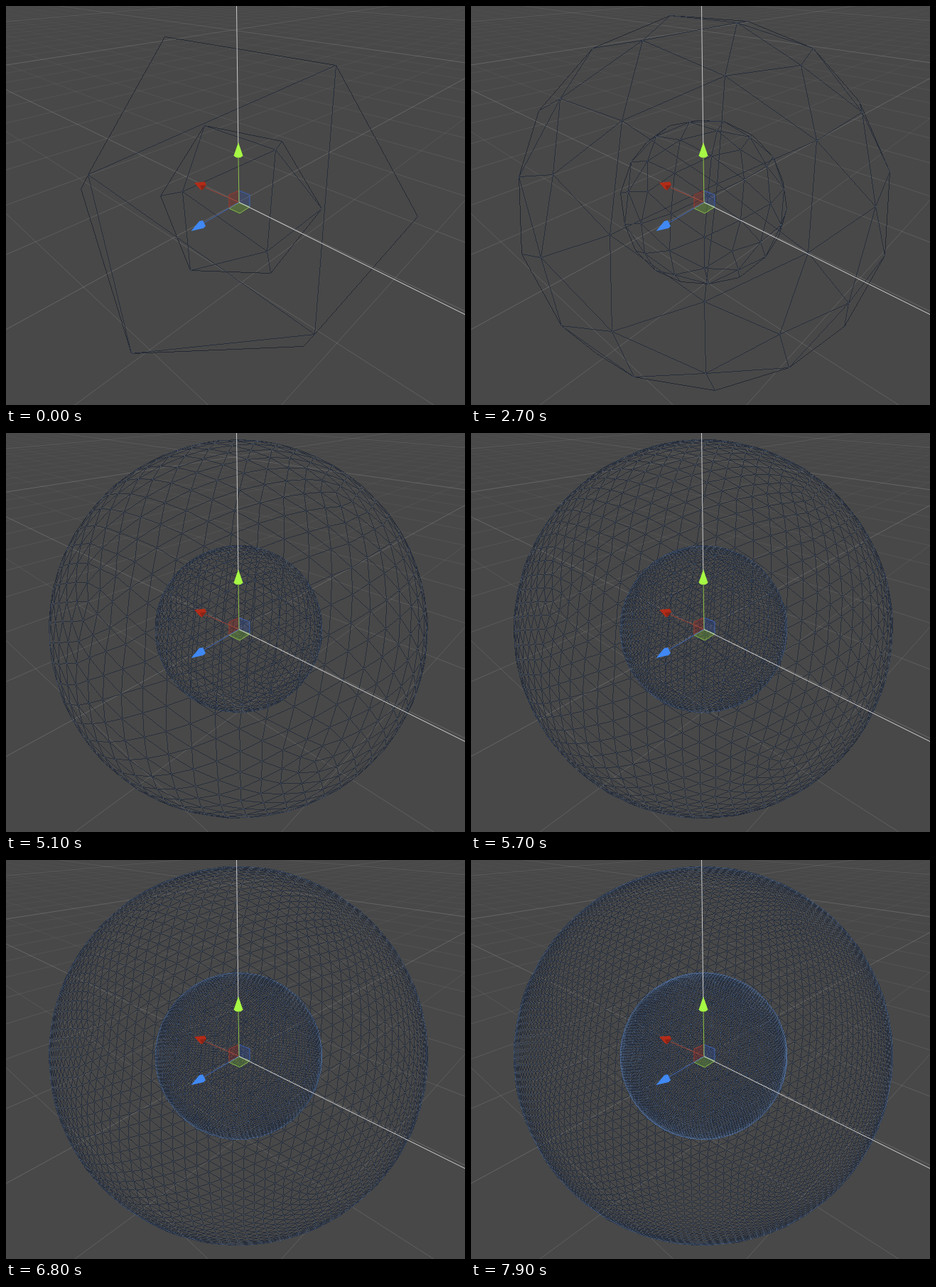
An HTML page with a canvas that plays this animation: 646x562 px, repeating every 8 s.

```html
<!DOCTYPE html>
<html>
<head>
<meta charset="utf-8">
<style>
html, body { margin: 0; width: 100%; height: 100%; overflow: hidden; background: #484848; }
canvas { display: block; }
</style>
</head>
<body>
<canvas id="stage" width="646" height="562"></canvas>
<script>
const W = 646, H = 562, LOOP = 8000;
const ctx = document.getElementById('stage').getContext('2d', { willReadFrequently: true });

// Image of the world origin, ground cell size, sphere radii
const OX = 327.6, OY = 276.2, CELL = 0.482, RADII = [1, 0.479];

// A view turns world points into [right, up, towards] and then into pixels
function makeView({ focal, dist, yaw, pitch, roll = 0, cx, cy }) {
  const rad = Math.PI / 180;
  const ca = Math.cos(yaw * rad), sa = Math.sin(yaw * rad);
  const cp = Math.cos(pitch * rad), sp = Math.sin(pitch * rad);
  return {
    dist,
    turn([x, y, z]) {
      const r = -ca * x - sa * z, b = ca * z - sa * x;
      const u = y * cp - b * sp;
      return [r - roll * u, u + roll * r, y * sp + b * cp];
    },
    project([r, u, w]) {
      const d = dist - w;
      return [OX + (focal * r + cx * w) / d, OY - (focal * u - cy * w) / d];
    }
  };
}
const gridView = makeView({ focal: 570, dist: 2.36, yaw: 42.5, pitch: 30, cx: -16, cy: 10 });
const meshView = makeView({ focal: 552, dist: 2.3, yaw: 41.5, pitch: 32, roll: 0.009, cx: -3, cy: -1 });

function line(a, b, color) {
  ctx.strokeStyle = color;
  ctx.lineWidth = 1;
  ctx.beginPath();
  ctx.moveTo(...a);
  ctx.lineTo(...b);
  ctx.stroke();
}

function poly(points, fill, stroke) {
  ctx.beginPath();
  points.forEach(p => ctx.lineTo(...p));
  ctx.closePath();
  ctx.fillStyle = fill;
  ctx.fill();
  if (stroke) {
    ctx.strokeStyle = stroke;
    ctx.lineWidth = 1;
    ctx.stroke();
  }
}

function gridSegment(p, q, major) {
  const a = gridView.turn(p), b = gridView.turn(q);
  const near = gridView.dist - Math.max(a[2], b[2]);
  if (near < 0.2) return;
  const alpha = major ? Math.min(0.22, 1.2 / near) : Math.min(0.17, 0.3 / near);
  line(gridView.project(a), gridView.project(b), `rgba(205,205,205,${alpha})`);
}

function drawGround() {
  ctx.fillStyle = '#484848';
  ctx.fillRect(0, 0, W, H);
  const N = 30;
  for (let i = -N; i <= N; i++) {
    const g = i * CELL, major = i % 10 === 0;
    for (let j = -N; j < N; j++) {
      const s = j * CELL, e = s + CELL;
      gridSegment([g, 0, s], [g, 0, e], major);
      gridSegment([s, 0, g], [e, 0, g], major);
    }
  }
}

function drawGizmo() {
  const center = [328, 276.5];
  poly([[314, 266], [328, 260], [328, 277], [314, 285]], 'rgba(170,35,25,.28)', '#9a3a2e');
  poly([[328, 260], [343, 266], [343, 283], [328, 277]], 'rgba(45,80,170,.28)', '#3c62b4');
  poly([[314, 285], [328, 277], [343, 283], [329, 292]], 'rgba(110,170,50,.35)', '#86bc48');

  line([324.5, 0], [326.8, 194], '#cacaca');
  line(center, [646, 434.5], '#d0d0d0');
  line([327, 212], center, '#8cc044');
  line([281, 256], center, '#a04436');
  line([278, 306], center, '#4068b8');

  poly([[327, 192], [333.5, 211], [330, 213.5], [324, 213.5], [320.5, 211]], '#a6f944');
  poly([[265, 249], [280, 247.5], [282, 252], [276, 259.5], [273, 258]], '#b22c18');
  poly([[273, 253], [282, 252], [276, 259.5]], '#8a2417');
  poly([[260.5, 317], [272, 303], [277, 302], [281, 310], [278, 313]], '#4088f4');
}

// Icosahedron corners already turned to the view, and its faces
const PHI = (1 + Math.sqrt(5)) / 2;
const corners = [];
for (const a of [-1, 1])
  for (const b of [-PHI, PHI])
    for (const v of [[a, b, 0], [0, a, b], [b, 0, a]])
      corners.push(meshView.turn(v));

const dot = (a, b) => a[0] * b[0] + a[1] * b[1] + a[2] * b[2];
const cross = (a, b) => [a[1] * b[2] - a[2] * b[1], a[2] * b[0] - a[0] * b[2], a[0] * b[1] - a[1] * b[0]];
const adjacent = (a, b) => Math.abs(dot(a, b) - PHI) < 0.1;

const faces = [];
corners.forEach((a, i) => corners.slice(i + 1).forEach((b, j) =>
  corners.slice(i + j + 2).forEach(c => {
    if (adjacent(a, b) && adjacent(b, c) && adjacent(a, c))
      faces.push(dot(a, cross(b, c)) > 0 ? [a, b, c] : [a, c, b]);
  })));

// How many triangle outlines cover each pixel
const hits = new Uint16Array(W * H);

function plotEdge(p, q) {
  let x0 = Math.floor(p[0]), y0 = Math.floor(p[1]), x1 = Math.floor(q[0]), y1 = Math.floor(q[1]);
  if (x0 > x1 || (x0 === x1 && y0 > y1)) [x0, y0, x1, y1] = [x1, y1, x0, y0];
  const n = Math.max(x1 - x0, Math.abs(y1 - y0)) || 1;
  const dx = (x1 - x0) / n, dy = (y1 - y0) / n;
  for (let k = 0; k <= n; k++) {
    const x = Math.round(x0 + dx * k), y = Math.round(y0 + dy * k);
    if (x >= 0 && x < W && y >= 0 && y < H) hits[y * W + x]++;
  }
}

function plotTriangle(a, b, c) {
  const area = (b[0] - a[0]) * (c[1] - a[1]) - (b[1] - a[1]) * (c[0] - a[0]);
  if (area >= 0) return; // faces away
  plotEdge(a, b);
  plotEdge(b, c);
  plotEdge(c, a);
}

function plotSphere(n, radius) {
  for (const [a, b, c] of faces) {
    const rows = [];
    for (let i = 0; i <= n; i++) {
      rows.push([]);
      for (let j = 0; j <= n - i; j++) {
        const v = a.map((s, k) => s * (n - i - j) + b[k] * i + c[k] * j);
        const scale = radius / Math.hypot(...v);
        rows[i].push(meshView.project(v.map(s => s * scale)));
      }
    }
    for (let i = 0; i < n; i++)
      for (let j = 0; j < n - i; j++) {
        plotTriangle(rows[i][j], rows[i + 1][j], rows[i][j + 1]);
        if (i + j < n - 1) plotTriangle(rows[i + 1][j], rows[i + 1][j + 1], rows[i][j + 1]);
      }
  }
}

// Wire colour goes from dark to blue where many outlines overlap
const DARK = [28, 34, 46], BLUE = [105, 152, 220], OPACITY = 0.82;
const mix = (a, b, t) => a + (b - a) * t;
drawGround();
const ground = ctx.getImageData(0, 0, W, H);

function drawScene(n) {
  hits.fill(0);
  RADII.forEach(r => plotSphere(n, r));
  const image = new ImageData(new Uint8ClampedArray(ground.data), W, H);
  hits.forEach((k, i) => {
    if (!k) return;
    const t = 1 - Math.pow(0.935, k - 1);
    for (let c = 0; c < 3; c++) {
      const at = i * 4 + c;
      image.data[at] = mix(image.data[at], mix(DARK[c], BLUE[c], t), OPACITY);
    }
  });
  ctx.putImageData(image, 0, 0);
  drawGizmo();
}

// Subdivision n begins here: slow at first, then at a steady pace, on 100 ms ticks
const startOf = n => 100 * Math.ceil((3537 + 127.2 * n - 3385 * Math.pow(0.6, n - 2)) / 100);

let shown = 0;
function tick() {
  const t = performance.now() % LOOP;
  let n = 1;
  while (startOf(n + 1) <= t) n++;
  if (n !== shown) drawScene(shown = n);
  requestAnimationFrame(tick);
}
tick();
</script>
</body>
</html>
```
